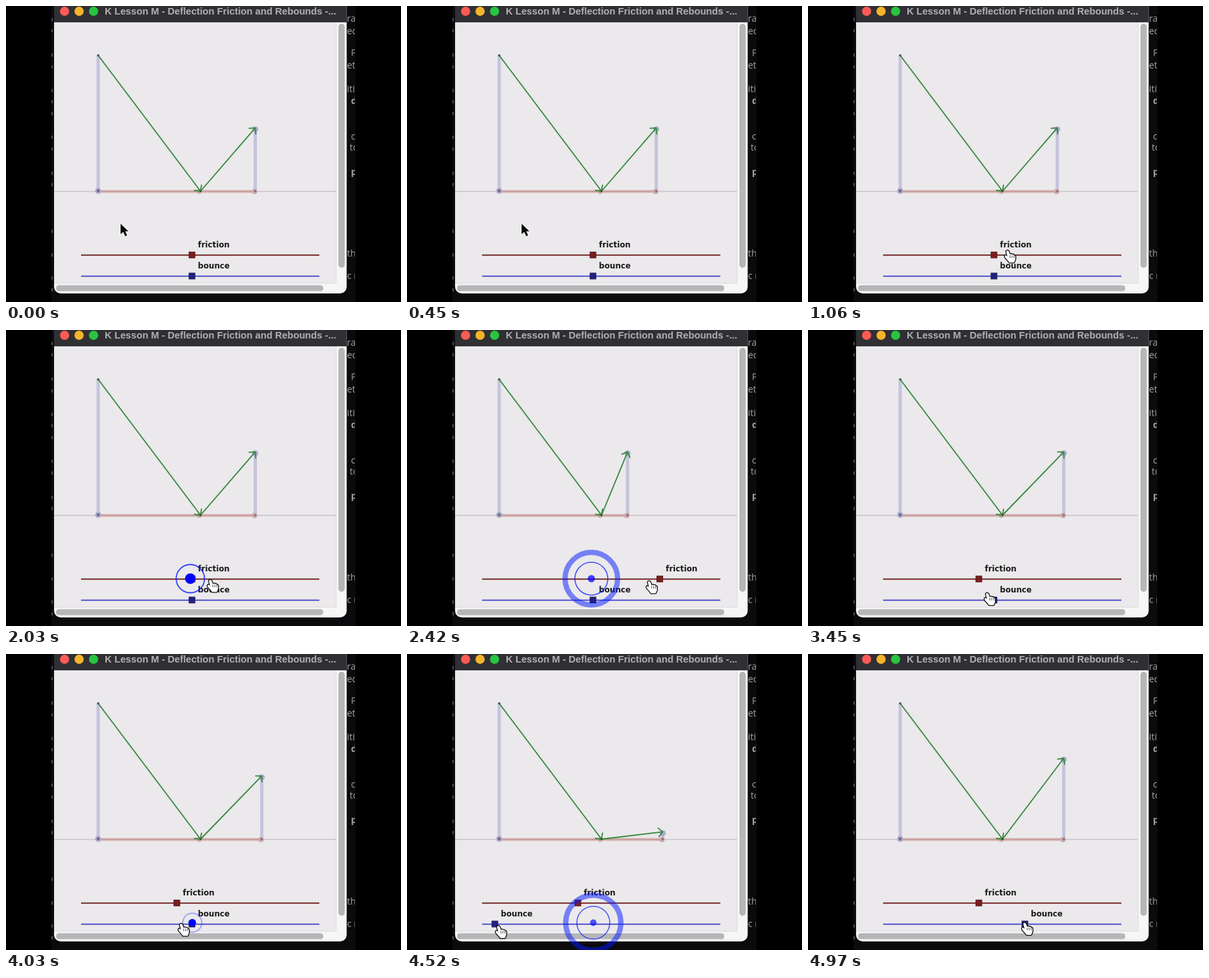
Animation, 600 px wide and 450 px high, one loop 5000 ms. Source, as an HTML page with a canvas:

```html
<!DOCTYPE html>
<html lang="en">
<head>
<meta charset="utf-8">
<style>
  html, body { margin: 0; width: 100%; height: 100%; overflow: hidden; background: #000; }
  canvas { display: block; }
</style>
</head>
<body>
<canvas id="stage" width="600" height="450"></canvas>
<script>
const ctx = document.getElementById('stage').getContext('2d');
const LOOP = 5000, LAG = 70;
const START = { x: 140, y: 75 }, HIT = { x: 295.5, y: 281.5 };
const TRACK = { left: 114, right: 476 };

// Pointer path: time, x, y
const PATH = [
  [575, 174, 331], [735, 299, 370], [970, 299, 370], [1050, 303, 371], [1240, 300, 373],
  [1420, 300, 373], [1900, 281, 378], [1960, 281, 378], [2180, 400, 383], [2960, 258, 375],
  [3060, 258, 375], [3200, 244, 386], [3560, 280, 403], [3980, 282, 409], [4230, 133, 413],
  [4480, 133, 413], [4880, 329, 408]
];
const DRAG_FRICTION = [1960, 2970], DRAG_BOUNCE = [3980, LOOP];
const CLICKS = [{ t: 1960, x: 280, y: 378 }, { t: 4000, x: 283, y: 408.5 }];

const HAND = new Path2D('M-2 2Q0-1 2 2L4 7Q6 5 7 7Q9 6 10 8Q12 8 12 10L12 14Q11 17 10 19L3 19Q0 15-3 12Q-5 9-3 8Q-1 8 0 10Z');
const ARROW = new Path2D('M0 0V16L4 12.5L7 19L10 17.7L7.2 11.5H12Z');

const clamp = (v, a, b) => Math.min(b, Math.max(a, v));
const ease = s => s * s * (3 - 2 * s);
const mix = (a, b, s) => a + (b - a) * s;

function pointer(t) {
  const i = PATH.findIndex(key => key[0] > t);
  if (i < 1) {
    const [, x, y] = i ? PATH[PATH.length - 1] : PATH[0];
    return { x, y };
  }
  const [t0, x0, y0] = PATH[i - 1], [t1, x1, y1] = PATH[i];
  const s = ease((t - t0) / (t1 - t0));
  return { x: mix(x0, x1, s), y: mix(y0, y1, s) };
}

const knobAt = (t, [from, to], offset) =>
  clamp(pointer(clamp(t - LAG, from, to)).x + offset, TRACK.left, TRACK.right);
const ratio = x => (x - TRACK.left) / (TRACK.right - TRACK.left);

function line(x1, y1, x2, y2, color, width) {
  ctx.strokeStyle = color;
  ctx.lineWidth = width;
  ctx.beginPath();
  ctx.moveTo(x1, y1);
  ctx.lineTo(x2, y2);
  ctx.stroke();
}

function rect(x, y, w, h, color, radius = 0) {
  ctx.fillStyle = color;
  ctx.beginPath();
  ctx.roundRect(x, y, w, h, radius);
  ctx.fill();
}

function disc(x, y, r, color) {
  ctx.fillStyle = color;
  ctx.beginPath();
  ctx.arc(x, y, r, 0, 7);
  ctx.fill();
}

function ring(x, y, r, color, width) {
  ctx.strokeStyle = color;
  ctx.lineWidth = width;
  ctx.beginPath();
  ctx.arc(x, y, r, 0, 7);
  ctx.stroke();
}

function label(text, x, y, font, color) {
  ctx.font = font;
  ctx.fillStyle = color;
  ctx.fillText(text, x, y);
}

function arrow(x1, y1, x2, y2, color, width, head) {
  line(x1, y1, x2, y2, color, width);
  const angle = Math.atan2(y2 - y1, x2 - x1);
  for (const turn of [-0.8, 0.8])
    line(x2, y2, x2 - head * Math.cos(angle + turn), y2 - head * Math.sin(angle + turn), color, width);
}

function backdrop() {
  rect(0, 0, 600, 450, '#000');
  rect(69, 0, 462, 450, '#0b0b0d');
  ctx.save();
  ctx.beginPath();
  ctx.rect(69, 0, 461, 450);
  ctx.clip();
  const scraps = [['ra', 24], ['ed', 43], ['P', 76, 6], ['etr', 95], ['iti', 131], ['d', 149, 6],
    ['c', 203, 6], ['to', 220, 4], ['p', 257, 6], ['th', 381], ['c r', 415]];
  for (const [text, y, dx = 0] of scraps) {
    const bold = text === 'd' || text === 'p' ? 'bold ' : '';
    label(text, 518 + dx, y, bold + '14px "Open Sans", sans-serif', '#a09fa3');
  }
  for (const y of [18, 35, 72, 90, 126, 143, 161, 197, 215, 252, 269, 340, 376, 411, 429])
    rect(69, y, 2, 5, '#49494c');
  ctx.restore();
}

function windowFrame() {
  rect(73, -20, 444.5, 457, '#f7f6f7', 10);
  rect(73, 24, 428.5, 397, '#ebe9eb');
  rect(73, 0, 444.5, 24.5, '#303034');
  line(73, 24, 517.5, 24, '#202023', 1);
  disc(89, 8, 7, '#fb5b54');
  disc(111, 8, 7, '#f6b42c');
  disc(133, 8, 7, '#29c440');
  label('K Lesson M - Deflection Friction and Rebounds -...', 150, 13,
    'bold 14.7px "Liberation Sans", Arial, sans-serif', '#b1b0b4');
  line(501.5, 25, 501.5, 421, '#dedcde', 1);
  line(73, 421.5, 501, 421.5, '#dedcde', 1);
  rect(505, 27, 9.5, 371, '#b6b5b7', 5);
  rect(76, 424.5, 406, 9, '#b6b5b7', 5);
}

function diagram(friction, bounce) {
  const endX = HIT.x + (HIT.x - START.x) * (1 - ratio(friction));
  const endY = HIT.y - (HIT.y - START.y) * ratio(bounce);
  const blue = '#c5c3dc', red = '#d9b9b7', green = '#36873f';
  line(73, 282, 501, 282, '#d0cccf', 2);
  line(START.x, START.y, START.x, 281, blue, 5);
  line(endX, 281, endX, endY, blue, 5);
  line(START.x, 282, endX, 282, red, 4.5);
  line(START.x, 281.8, endX, 281.8, '#c49a98', 1.5);
  disc(HIT.x - 2, 282, 3.5, '#cba09b');
  disc(endX - 1, 282, 4, '#c9a8ac');
  disc(START.x, 281, 4.5, '#aaa7cb');
  disc(START.x, 281, 2, '#64617e');
  disc(endX, endY + 2, 4.5, '#a9a8d0');
  disc(endX, 281.5, 1.8, '#9d6573');
  arrow(START.x, START.y, HIT.x, HIT.y, green, 1.8, 10);
  arrow(HIT.x, HIT.y, endX, endY, green, 1.8, 10);
  disc(START.x, START.y, 1.7, '#365a4c');
  disc(HIT.x, HIT.y, 1.6, '#285b2f');
}

function knob(text, x, y, color, edge) {
  rect(x - 5, y - 5, 10, 10, edge);
  rect(x - 4, y - 4, 8, 8, color);
  label(text, x + 9, y - 12, 'bold 11.8px "DejaVu Sans", sans-serif', '#1a191a');
}

function sliders(friction, bounce) {
  line(TRACK.left, 379.4, TRACK.right, 379.4, '#c65a5a', 1.3);
  line(TRACK.left, 378.3, TRACK.right, 378.3, '#4a2c2d', 1.2);
  line(TRACK.left, 410.7, TRACK.right, 410.7, '#5554ce', 2);
  knob('friction', friction, 378.5, '#7d1d1e', '#4e1718');
  knob('bounce', bounce, 410.5, '#22227f', '#191958');
}

function ripple(age, x, y) {
  if (age < 0 || age > 720) return;
  const fade = 1 - clamp((age - 560) / 160, 0, 1);
  const late = clamp((age - 180) / 360, 0, 1);
  const early = clamp(age / 80, 0, 1);
  ctx.globalAlpha = fade;
  if (late > 0) ring(x, y, mix(25, 42, ease(late)), 'rgba(0,25,255,.5)', 8);
  ring(x, y, 25 * (1 - Math.exp(-age / 36)), `rgba(10,25,255,${0.9 * early - 0.2 * late})`, mix(1.8, 1.5, late));
  disc(x, y, mix(8 * clamp(0.4 + age / 100, 0, 1), 4.8, late), `rgba(0,0,255,${1 - 0.35 * late})`);
  ctx.globalAlpha = 1;
}

function cursor({ x, y }) {
  const overSlider = y > 355;
  const shape = overSlider ? HAND : ARROW;
  ctx.save();
  ctx.translate(x, y);
  ctx.lineJoin = 'round';
  ctx.lineWidth = overSlider ? 2.6 : 2;
  ctx.strokeStyle = overSlider ? '#111' : '#fff';
  ctx.fillStyle = overSlider ? '#fff' : '#080808';
  ctx.stroke(shape);
  ctx.fill(shape);
  if (overSlider) for (const fx of [4, 7, 10]) line(fx, 8, fx, 12, '#333', 0.9);
  ctx.restore();
}

function draw() {
  const t = performance.now() % LOOP;
  const friction = knobAt(t, DRAG_FRICTION, 1.5);
  const bounce = knobAt(t, DRAG_BOUNCE, 0.5);
  backdrop();
  windowFrame();
  diagram(friction, bounce);
  sliders(friction, bounce);
  for (const click of CLICKS) ripple(t - click.t, click.x, click.y);
  cursor(pointer(t));
  requestAnimationFrame(draw);
}
draw();
</script>
</body>
</html>
```
